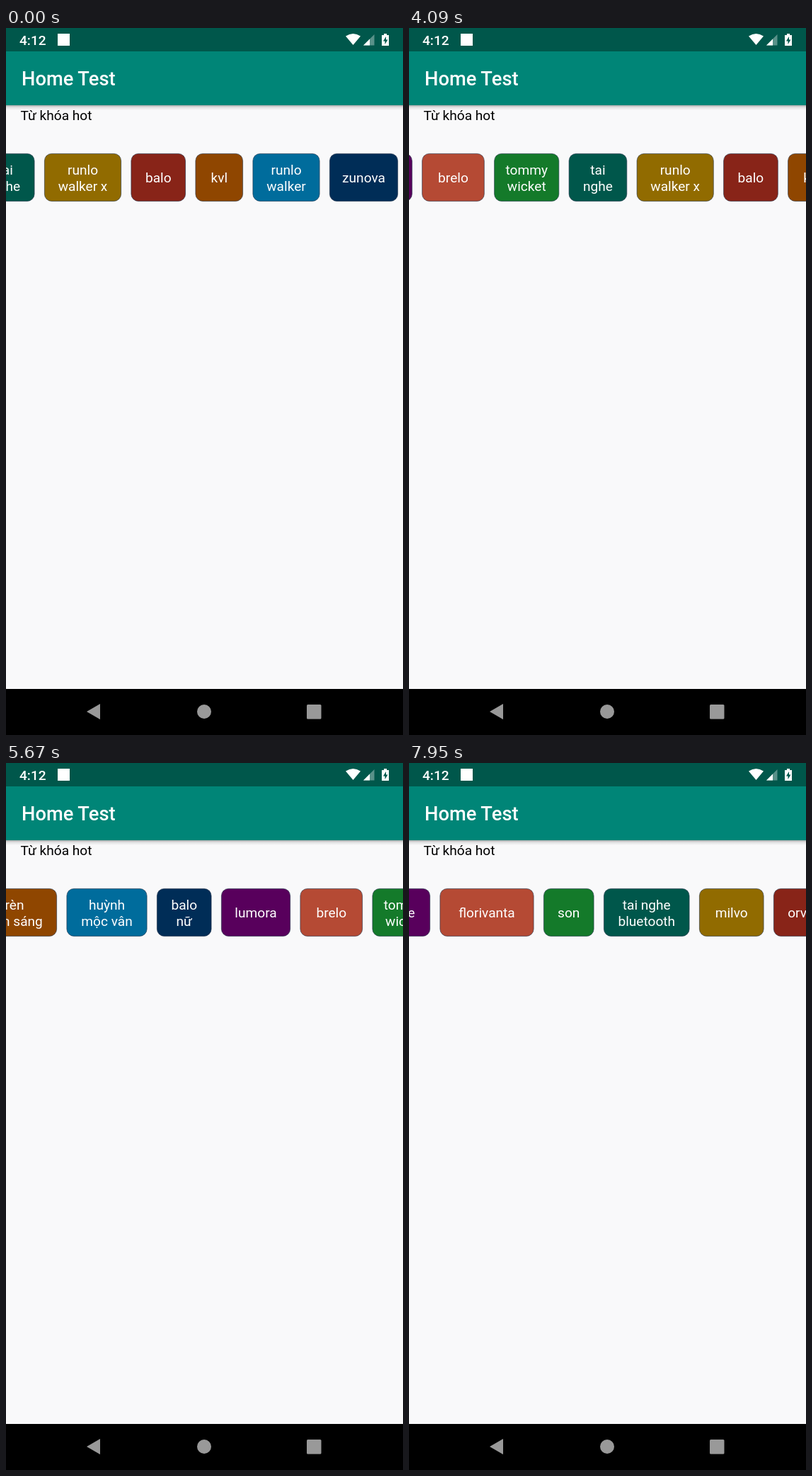
An HTML page that plays this animation: 561 by 998 pixels, repeating every 8000 ms.

```html
<!DOCTYPE html>
<html lang="vi">
<head>
<meta charset="utf-8">
<title>Home Test</title>
<style>
  html, body { margin: 0; width: 100%; height: 100%; overflow: hidden; }
  svg { display: block; width: 561px; height: 998px; background: #f9f9fa; }
  text { font: 19.1px Roboto, sans-serif; }
  .medium { font-weight: 500; }
  .white, .chip text { fill: #fff; }
  .chip text { text-anchor: middle; }
  .chip rect { stroke: #1c2c44; stroke-opacity: .75; stroke-width: .8; }
</style>
</head>
<body>
<svg viewBox="0 0 561 998">
  <defs>
    <linearGradient id="shadow" x2="0" y2="1">
      <stop offset="0" stop-opacity=".32"/>
      <stop offset=".4" stop-opacity=".1"/>
      <stop offset="1" stop-opacity="0"/>
    </linearGradient>
  </defs>

  <rect y="109" width="561" height="7" fill="url(#shadow)"/>
  <rect width="561" height="109" fill="#008577"/>
  <rect width="561" height="33" fill="#00574b"/>

  <!-- Status bar -->
  <g class="white">
    <text class="medium" x="19" y="24">4:12</text>
    <rect x="73" y="8" width="17" height="17"/>
    <path d="M480 11.5Q490.5 4.500 501 11.500L490.500 24Z"/>
    <path d="M505 24.500L520.500 9V24.500Z" opacity=".35"/>
    <path d="M505 24.500L514 15.500V24.500Z"/>
    <path d="M534 8H538V10H541V25H531V10H534Z"/>
  </g>
  <path d="M537 12L533 18.500H535.500V23L539.500 16.500H537Z" fill="#00574b"/>

  <text class="medium white" x="22" y="81" style="font-size:27.3px">Home Test</text>
  <text x="20.500" y="130">Từ khóa hot</text>

  <g id="chips"></g>

  <!-- Navigation bar -->
  <rect y="933" width="561" height="65"/>
  <g fill="#999">
    <path d="M114 965L133 954V976Z"/>
    <circle cx="280" cy="965" r="10"/>
    <rect x="425" y="955" width="20.500" height="20.500" rx="1.500"/>
  </g>
</svg>

<script>
const LOOP = 8000, GAP = 13.5;
const colors = ['#58005c', '#b54a34', '#147a2a', '#00574b', '#916b00',
                '#882418', '#8f4600', '#006c9c', '#002d57'];

// Label (| breaks the line) and chip width
const chips = [
  ['cafe', 80], ['florivanta', 133], ['son', 71.5], ['tai nghe|bluetooth', 121.5],
  ['milvo', 91.5], ['orva', 77.5], ['rèn|tâm sáng', 120], ['huỳnh|mộc vân', 114],
  ['balo|nữ', 77.5], ['lumora', 98], ['brelo', 88.5], ['tommy|wicket', 92],
  ['tai|nghe', 82.5], ['runlo|walker x', 109], ['balo', 77.5], ['kvl', 67.5],
  ['runlo|walker', 95], ['zunova', 97]
];

// Scroll distance at given times
const scroll = [
  [0, 0], [3260, 0], [3590, 44.3], [4090, 267.5], [4470, 330], [5090, 330],
  [5300, 531], [5670, 665], [6050, 665], [6300, 898], [6420, 925],
  [6960, 925], [7500, 1190], [7950, 1319], [LOOP, 1319]
];

const row = document.getElementById('chips');

function buildRow() {
  let right = 554, html = '';
  for (let i = chips.length - 1; i >= 0; i--) {
    const [label, width] = chips[i], lines = label.split('|');
    const left = right - width;
    html += `<g class="chip"><rect x="${left + .4}" y="177.400" width="${width - .8}" height="67" rx="10" fill="${colors[i % colors.length]}"/>`;
    lines.forEach((line, n) => {
      const y = 218.4 + (n - (lines.length - 1) / 2) * 22.4;
      html += `<text x="${left + width / 2}" y="${y}">${line}</text>`;
    });
    html += '</g>';
    right = left - GAP;
  }
  row.innerHTML = html;
}

const slope = i => (scroll[i + 1][1] - scroll[i][1]) / (scroll[i + 1][0] - scroll[i][0]);

// Harmonic mean of neighbouring slopes keeps the curve monotone
function tangent(i) {
  if (i === 0 || i === scroll.length - 1) return 0;
  const a = slope(i - 1), b = slope(i);
  return a * b > 0 ? 2 * a * b / (a + b) : 0;
}

function scrollAt(time) {
  let i = 0;
  while (time >= scroll[i + 1][0]) i++;
  const [t0, x0] = scroll[i], [t1, x1] = scroll[i + 1];
  const span = t1 - t0, u = (time - t0) / span, v = 1 - u;
  return v * v * (1 + 2 * u) * x0 + u * u * (1 + 2 * v) * x1
       + span * u * v * (v * tangent(i) - u * tangent(i + 1));
}

function draw() {
  const time = performance.now() % LOOP;
  row.setAttribute('transform', `translate(${scrollAt(time).toFixed(1)} 0)`);
  requestAnimationFrame(draw);
}

buildRow();
draw();
</script>
</body>
</html>
```
